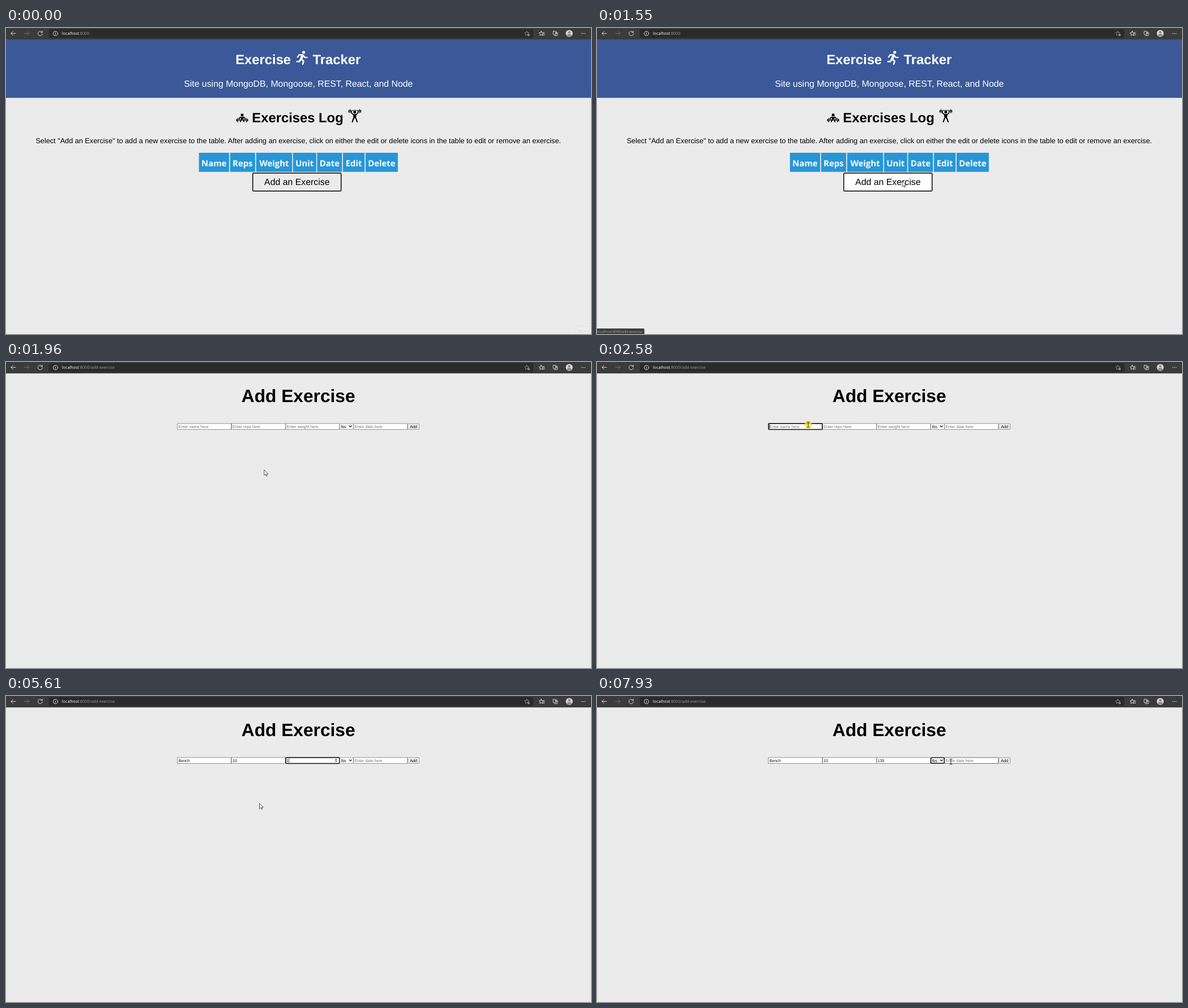
An HTML page for the animation above (8000 ms loop, 1033x542 px).

```html
<!DOCTYPE html>
<html lang="en">
<head>
<meta charset="utf-8">
<title>Exercise Tracker</title>
<style>
  html, body { margin: 0; width: 100%; height: 100%; overflow: hidden; background: #ebebeb; }
  svg { display: block; width: 100vw; height: 100vh; }
  text { font-family: "Liberation Sans", Arial, sans-serif; text-rendering: geometricPrecision; white-space: pre; }
  .ui { font-family: "Open Sans", "Noto Sans", sans-serif; }
  .mid { text-anchor: middle; }
  .bold { font-weight: 700; }
  .small { font-size: 7.17px; }
  .line { fill: none; stroke-linecap: round; stroke-linejoin: round; }
</style>
</head>
<body>
<svg id="stage" viewBox="0 0 1033 542" preserveAspectRatio="none">
  <rect width="1033" height="542" fill="#ebebeb"/>

  <g id="logPage">
    <rect y="20" width="1033" height="103.7" fill="#3b5998"/>
    <g fill="#fff">
      <text class="bold" x="405.2" y="64.3" font-size="23.8">Exercise</text>
      <text class="bold" x="541.6" y="64.3" font-size="23.8">Tracker</text>
      <text class="mid" x="516.3" y="104" font-size="15.85">Site using MongoDB, Mongoose, REST, React, and Node</text>
      <circle cx="525.7" cy="43" r="2.6"/>
    </g>
    <g class="line" stroke="#fff">
      <path d="M523.6 48.5L521 55.5" stroke-width="4.4"/>
      <path d="M523 47.6L517.6 47.4L514.8 51.6M525 48.4L527.6 52.2L531.6 52.2" stroke-width="2.2"/>
      <path d="M521.6 55.6L525.6 58.6L524 64M519.8 55.8L518.2 59.4L513.8 59.4" stroke-width="2.6"/>
    </g>

    <text class="bold" x="434.3" y="166.8" font-size="23.8">Exercises Log</text>
    <circle cx="417" cy="153.9" r="2.5"/>
    <g class="line" stroke="#000">
      <path d="M406.5 163.2H427.5" stroke-width="1"/>
      <path d="M407.4 161.4V165M409.4 160V166.4M424.6 160V166.4M426.6 161.4V165" stroke-width="1.3"/>
      <path d="M414.4 157.6L411.8 159.6L412 163M419.6 157.6L422.2 159.6L422 163" stroke-width="1.6"/>
      <path d="M414.8 158.2H419.2L418.6 160.8H415.4Z" fill="#000" stroke-width="1.4"/>
      <path d="M415.6 161.6L413.8 165.8M418.4 161.6L420.2 165.8" stroke-width="1.9"/>
    </g>
    <circle cx="615.8" cy="149" r="2.5"/>
    <g class="line" stroke="#000">
      <path d="M605 147.6Q616 144.2 627 147.2" stroke-width="1"/>
      <path d="M605.5 145.6V149.6M607.6 144V150.2M624.4 144V150.2M626.4 145.4V149.4" stroke-width="1.2"/>
      <path d="M613.4 153.4L610.2 150.6L609.6 147M618.2 153.4L621.4 150.6L622 147" stroke-width="1.7"/>
      <path d="M613.4 153.2H618.2L617.2 158.6H614.4Z" fill="#000" stroke-width="1.5"/>
      <path d="M614.4 159L612.8 162.4L611.6 166.2M617.2 159L618.8 162.4L620 166.2" stroke-width="2.1"/>
    </g>
    <text class="mid" x="516.2" y="203.5" font-size="12.68">Select "Add an Exercise" to add a new exercise to the table. After adding an exercise, click on either the edit or delete icons in the table to edit or remove an exercise.</text>
    <g id="heads"></g>
    <rect id="button" x="435.7" y="257" width="156" height="31.8" rx="1.4" stroke="#000" stroke-width="1.5"/>
    <text class="mid" x="513.8" y="278.2" font-size="15.85">Add an Exercise</text>
    <g id="ghost">
      <rect x="1006" y="529" width="30" height="15" rx="1" fill="#eeeeee" stroke="#e0e0e0" stroke-width=".8"/>
      <text class="ui" x="1009" y="539" font-size="6.3" fill="#d2d2d2">Record</text>
    </g>
  </g>

  <g id="formPage">
    <text class="mid bold" x="516.2" y="71.2" font-size="31.7">Add Exercise</text>
    <g id="fields"></g>
    <rect x="589.6" y="109.1" width="23.6" height="10.2" rx=".6" fill="#fff" stroke="#767676" stroke-width=".7"/>
    <text class="small" x="591.6" y="116.6">lbs</text>
    <path class="line" d="M606 112.9L608.2 115.1L610.4 112.9" stroke="#000" stroke-width="1.1"/>
    <rect id="selectRing" x="589.7" y="109.1" width="23.4" height="10.2" rx="1.2" fill="none" stroke="#101010" stroke-width="1.4"/>
    <rect x="709.6" y="109.1" width="20" height="10.2" rx="1" fill="#efefef" stroke="#767676" stroke-width=".7"/>
    <text class="small mid" x="719.6" y="116.6">Add</text>
    <g id="popup">
      <rect x="588" y="120" width="27.4" height="22.4" rx="1" fill="#000" opacity=".08"/>
      <rect x="589.3" y="119.9" width="24.8" height="21.2" fill="#fff" stroke="#767676" stroke-width=".6"/>
      <rect x="589.6" y="120.2" width="24.2" height="10.3" fill="#1e90ff"/>
      <text class="small" x="591.6" y="127.9" fill="#fff">lbs</text>
      <text class="small" x="591.6" y="138.2">kgs</text>
    </g>
  </g>

  <g id="toolbar">
    <rect width="1033" height="20.2" fill="#3b3b3b"/>
    <rect x="75.6" y="2" width="855.4" height="15.8" rx="2.6" fill="#2a2a2a"/>
    <g class="line" stroke="#e6e6e6" stroke-width=".9">
      <path d="M17 9.6H8.8M12.4 6L8.8 9.6L12.4 13.2"/>
      <path d="M32.6 9.6H40.8M37.2 6L40.8 9.6L37.2 13.2" stroke="#757575"/>
      <path d="M63.8 7.6A4 4 0 1 0 64.4 10M64.2 5.4V7.9H61.7"/>
      <circle cx="87.4" cy="9.8" r="4"/>
      <path d="M87.4 9.4V11.8M87.4 7.7V7.8"/>
      <g id="stars"></g>
      <path d="M949 8.2H951M949 10.4H951M948.4 12.6H951" stroke-width=".8"/>
      <rect x="966" y="5.8" width="5.8" height="5.8" rx="1"/>
      <path d="M968 13.6H972.8Q974 13.6 974 12.4V8M969.4 8.7H973M971.2 7V10.5"/>
    </g>
    <circle cx="923" cy="12.4" r="2" fill="#8d8d8d"/>
    <circle cx="994.6" cy="9.6" r="6.1" fill="#d9d5d5"/>
    <circle cx="994.6" cy="7.6" r="2.2" fill="#8e8888"/>
    <path d="M990.4 13.4Q990.8 10.5 994.6 10.5Q998.4 10.5 998.8 13.4Q994.6 16 990.4 13.4Z" fill="#8e8888"/>
    <g fill="#e6e6e6"><circle cx="1016.6" cy="9.8" r=".75"/><circle cx="1019.4" cy="9.8" r=".75"/><circle cx="1022.2" cy="9.8" r=".75"/></g>
    <text class="ui" x="98.8" y="12.4" font-size="7.2" fill="#fff">localhost<tspan id="path" fill="#9b9b9b"></tspan></text>
  </g>

  <g id="status">
    <path id="statusBar" fill="#3b3b3b"/>
    <text class="ui" x=".4" y="540" font-size="6.15" fill="#b4b4b4">localhost:8000/add-exercise</text>
  </g>

  <circle id="glow" r="6.8" fill="#f5e51b" opacity=".72"/>
  <path id="arrow" d="M0 0V9.7L2.3 7.7L3.8 10.9L5.3 10.2L3.8 7.1H6.9Z" fill="#fff" stroke="#111" stroke-width=".7" stroke-linejoin="round"/>
  <path id="beam" class="line" d="M-2.2 -4.8Q0 -4.8 0 -3.8Q0 -4.8 2.2 -4.8M0 -4V4M-2.2 4.8Q0 4.8 0 3.8Q0 4.8 2.2 4.8" stroke="#111" stroke-width=".85"/>
</svg>

<script>
const LOOP = 8000, TICK = 67.6;
const $ = id => document.getElementById(id);

function add(parent, tag, attrs, text) {
  const el = document.createElementNS("http://www.w3.org/2000/svg", tag);
  for (const key in attrs) el.setAttribute(key, attrs[key]);
  if (text) el.textContent = text;
  return parent.appendChild(el);
}
const show = (el, on) => el.setAttribute("visibility", on ? "inherit" : "hidden");
const within = (t, ranges) => ranges.some(([a, b]) => t >= a && t < b);

// Table header: label, left edge, width
[["Name", 340.7, 53.2], ["Reps", 395.7, 44.2], ["Weight", 441.7, 63.5], ["Unit", 506.8, 41],
 ["Date", 549.4, 43.9], ["Edit", 595, 38.2], ["Delete", 634.9, 57]].forEach(([label, x, w]) => {
  add($("heads"), "rect", { x, y: 221, width: w, height: 33.8, fill: "#2796d7" });
  add($("heads"), "text", { class: "ui bold mid", x: x + w / 2, y: 244.6, "font-size": 14.9, fill: "#fff" }, label);
});

function star(cx, cy, color) {
  let d = "";
  for (let i = 0; i < 10; i++) {
    const a = i * Math.PI / 5 - Math.PI / 2, r = i % 2 ? 2 : 4.3;
    d += (i ? "L" : "M") + (cx + r * Math.cos(a)) + " " + (cy + r * Math.sin(a));
  }
  add($("stars"), "path", { d: d + "Z", stroke: color });
}
star(919.6, 9.8, "#8d8d8d");
star(945.2, 9.8, "#e6e6e6");

// keys: when each character is typed; focus: start and end of focus
const fields = [
  { x: 302.4, hint: "Enter name here", value: "Bench", keys: [3550, 3750, 3880, 4020, 4150], focus: [2310, 4430] },
  { x: 398, hint: "Enter reps here", value: "10", keys: [4940, 5070], focus: [4430, 5210], spinner: true },
  { x: 493.6, hint: "Enter weight here", value: "135", keys: [5610, 5680, 5950], focus: [5210, 7060], spinner: true },
  { x: 613.5, hint: "Enter date here", value: "", keys: [], focus: [LOOP, LOOP] }
];
for (const f of fields) {
  const g = $("fields"), box = { x: f.x + .3, y: 109, width: 95, height: 10.4 };
  f.box = add(g, "rect", { ...box, fill: "#fff", "stroke-width": .75 });
  f.text = add(g, "text", { class: "small", x: f.x + 2, y: 116.6 });
  f.caret = add(g, "rect", { y: 110.2, width: .7, height: 7.6, fill: "#111" });
  f.spin = add(g, "path", { d: `M${f.x + 87.2} 113.2l2 -2.2l2 2.2zm0 1.6l2 2.2l2 -2.2z`, fill: "#444" });
}
for (const f of fields)
  f.ring = add($("fields"), "rect", { x: f.x + .5, y: 109, width: 94.8, height: 10.4, rx: 1.2, fill: "none", stroke: "#101010", "stroke-width": 1.5 });

// Pointer route: time, x, y
const route = [
  [70, 1018, 530], [300, 925, 478], [600, 665, 350], [870, 562, 300], [1280, 539, 271.5],
  [1680, 539, 271.5], [2240, 373, 111], [2640, 373, 111], [2960, 447.5, 190],
  [6360, 447.5, 190], [6430, 450, 189], [6560, 450, 189], [6770, 578.3, 122.3],
  [6970, 600, 114], [7790, 600, 114], [7930, 629.2, 116.8], [LOOP, 629.2, 116.8]
];
const clicks = [[1480, 1550], [2310, 2700], [7060, 7190], [7790, 7860]];
const caretOff = [[3100, 3550], [6360, 6860]];

function pointer(time) {
  const t = Math.floor((time + 20) / TICK) * TICK;
  const i = route.findIndex(k => k[0] > t);
  if (i < 1) return i < 0 ? route[route.length - 1].slice(1) : route[0].slice(1);
  const [t0, x0, y0] = route[i - 1], [t1, x1, y1] = route[i];
  const p = (t - t0) / (t1 - t0);
  return [x0 + (x1 - x0) * p, y0 + (y1 - y0) * p];
}

function drawField(f, t, x, y) {
  const focused = within(t, [f.focus]);
  const typed = f.value.slice(0, f.keys.filter(k => t >= k).length);
  const inside = y > 108 && y < 120 && x > f.x && x < f.x + 95;
  f.text.textContent = typed || f.hint;
  f.text.setAttribute("fill", typed ? "#111" : "#757575");
  f.box.setAttribute("stroke", inside ? "#444" : "#707070");
  show(f.ring, focused);
  show(f.spin, f.spinner && (focused || inside));
  show(f.caret, focused && !within(t, caretOff));
  if (focused) f.caret.setAttribute("x", f.x + 2 + (typed ? f.text.getComputedTextLength() : 0));
  return inside;
}

function draw(t) {
  const [x, y] = pointer(t), form = t >= 1620;
  const hover = !form && t >= 940 && y < 289;
  show($("logPage"), !form);
  show($("formPage"), form);
  $("path").textContent = form ? ":8000/add-exercise" : ":8000";
  $("button").setAttribute("fill", hover ? "#fff" : "#ebebeb");
  $("ghost").setAttribute("opacity", Math.max(0, 1 - Math.max(0, t - 70) / 270));

  show($("status"), hover || (form && t < 1820));
  const w = form ? 342 : 83.6;
  $("statusBar").setAttribute("d", `M0 532.2H${w - 1.5}Q${w} 532.2 ${w} 533.7V542H0Z`);

  let beam = false;
  for (const f of fields) beam = drawField(f, t, x, y) || beam;
  beam = beam && form;
  show($("selectRing"), t >= 7060);
  show($("popup"), within(t, [[7120, 7790]]));

  const move = `translate(${x} ${y})`;
  for (const id of ["glow", "arrow", "beam"]) $(id).setAttribute("transform", move);
  show($("glow"), within(t, clicks));
  show($("beam"), beam);
  show($("arrow"), t >= 70 && !beam);
}

let start;
function frame(now) {
  start ??= now;
  draw((now - start) % LOOP);
  requestAnimationFrame(frame);
}
draw(0);
requestAnimationFrame(frame);
</script>
</body>
</html>
```
